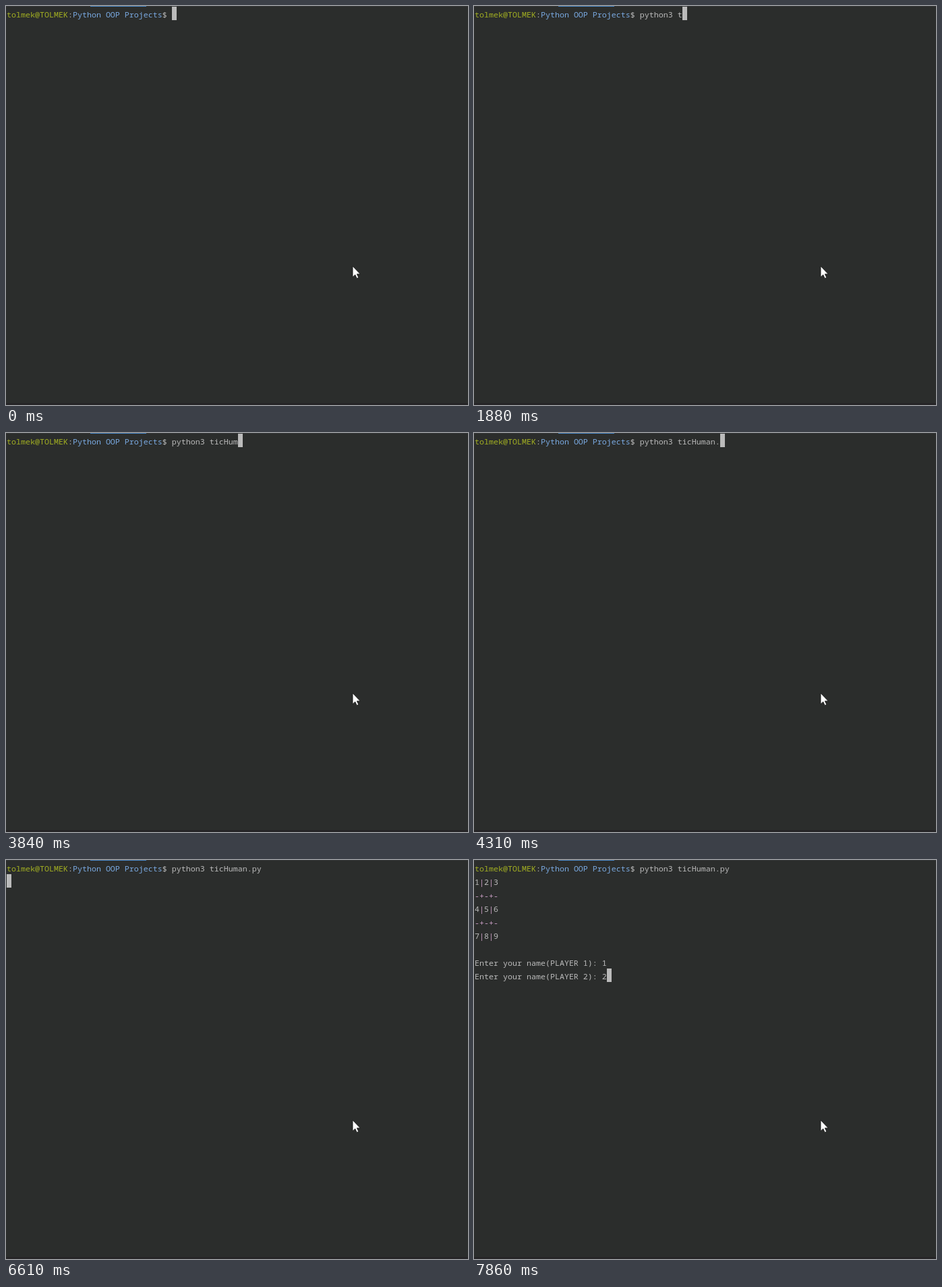
An HTML page that plays this animation: 685 by 592 pixels, repeating every 7990 ms.

```html
<!DOCTYPE html>
<html lang="en">
<head>
<meta charset="utf-8">
<title>Terminal session</title>
<style>
  html, body { margin: 0; width: 100%; height: 100%; overflow: hidden; background: #2b2d2c; }
  svg { display: block; }
  text {
    font: 11.667px "Noto Sans Mono", "DejaVu Sans Mono", monospace;
    white-space: pre;
    fill: #bbb;
  }
  .user { fill: #a3b022; }
  .path { fill: #7aaae2; }
  .grid { fill: #cb9fc6; }
</style>
</head>
<body>
<svg width="685" height="592" viewBox="0 0 685 592">
  <rect width="685" height="592" fill="#2b2d2c"/>
  <rect width="685" height="1" fill="#343637"/>
  <rect x="125" width="83" height="1" fill="#4a88c7"/>
  <rect y="589" width="685" height="3" fill="#262527"/>
  <g id="lines"></g>
  <rect id="caret" width="7" height="20" fill="#bbb"/>
  <path d="M514 386V402.2L517.7 398.8L520.2 404.2L522.8 403L520.3 397.8H525.2Z"
        fill="#fff" stroke="#161616" stroke-width=".8"/>
</svg>
<script>
const LOOP = 7990, CELL = 7, ROW = 20;
const COMMAND = "python3 ticHuman.py";
const PROMPT_COLS = 35, ASK_COLS = 27;

// When each character of the command appears
const KEYS = [200, 400, 500, 600, 800, 1000, 1200, 1350, 1880, 2230, 2360,
  3370, 3640, 3840, 3970, 4110, 4310, 4570, 4850];
const ENTER = 5150, OUTPUT = 7080, NAME1 = 7410, ASK2 = 7570, NAME2 = 7860;
const BLINKS = [[2890, 3370], [6150, 6610]];

const lines = document.getElementById("lines");
const caret = document.getElementById("caret");

function addLine(row, ...parts) {
  const ns = "http://www.w3.org/2000/svg";
  const line = document.createElementNS(ns, "text");
  line.setAttribute("x", 1);
  line.setAttribute("y", 17 + row * ROW);
  const spans = parts.map(([text, cls = ""]) => {
    const span = document.createElementNS(ns, "tspan");
    span.setAttribute("class", cls);
    span.textContent = text;
    line.append(span);
    return span;
  });
  lines.append(line);
  return { line, last: spans[spans.length - 1] };
}

const prompt = addLine(0, ["tolmek@TOLMEK", "user"], [":"],
  ["Python OOP Projects", "path"], ["$ "], [""]);

const board = ["1|2|3", "-+-+-", "4|5|6", "-+-+-", "7|8|9"].map((text, i) =>
  addLine(i + 1, ...[...text].map(c => [c, /\d/.test(c) ? "" : "grid"])));
const ask1 = addLine(7, ["Enter your name(PLAYER 1): "], [""]);
const ask2 = addLine(8, ["Enter your name(PLAYER 2): "], [""]);

const show = (item, on) => item.line.setAttribute("visibility", on ? "visible" : "hidden");

function caretCell(t, typed) {
  if (t < ENTER) return [PROMPT_COLS + typed, 0];
  if (t < OUTPUT) return [0, 1];
  if (t < ASK2) return [ASK_COLS + (t >= NAME1), 7];
  return [ASK_COLS + (t >= NAME2), 8];
}

function draw(t) {
  const typed = KEYS.filter(k => k <= t).length;
  prompt.last.textContent = COMMAND.slice(0, typed);
  [...board, ask1].forEach(item => show(item, t >= OUTPUT));
  show(ask2, t >= ASK2);
  ask1.last.textContent = t >= NAME1 ? "1" : "";
  ask2.last.textContent = t >= NAME2 ? "2" : "";

  const [col, row] = caretCell(t, typed);
  caret.setAttribute("x", 1 + col * CELL);
  caret.setAttribute("y", 1 + row * ROW);
  const off = BLINKS.some(([from, to]) => t >= from && t < to);
  caret.setAttribute("visibility", off ? "hidden" : "visible");
}

const start = performance.now();
function tick() {
  draw((performance.now() - start) % LOOP);
  requestAnimationFrame(tick);
}
tick();
</script>
</body>
</html>
```
